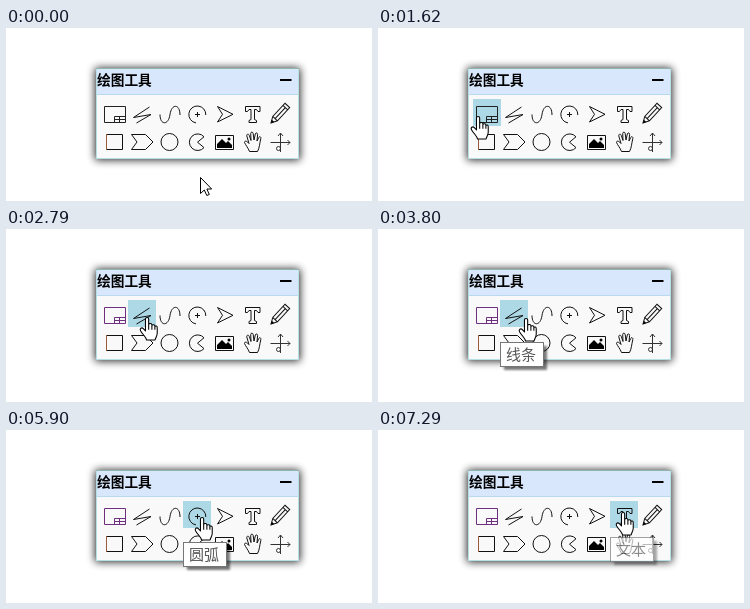
Animation of 366 by 173 pixels, one loop 8 s. Source, as an HTML page:

```html
<!DOCTYPE html>
<html lang="zh-CN">
<head>
<meta charset="utf-8">
<title>绘图工具</title>
<style>
  html, body { margin: 0; width: 100%; height: 100%; overflow: hidden; background: #fff; }
  svg { display: block; width: 366px; height: 173px; }
  text { font-family: "Noto Sans CJK SC", "Noto Sans CJK", sans-serif; }
  .title { font-size: 13.7px; font-weight: 700; fill: #000; }
  .icons { fill: none; stroke: #111; }
  .solid { fill: #000; stroke: none; }
  .cursor { fill: #fff; stroke: #000; stroke-linejoin: round; }
  #tipText { font-size: 15px; fill: #575757; }
</style>
</head>
<body>
<svg viewBox="0 0 366 173">
  <defs>
    <filter id="glow" x="-10%" y="-25%" width="120%" height="150%"><feGaussianBlur stdDeviation="4.5"/></filter>
    <filter id="soft" x="-10%" y="-20%" width="120%" height="150%"><feGaussianBlur stdDeviation="1"/></filter>
  </defs>

  <rect x="89" y="40" width="205" height="92" fill="#000" opacity=".85" filter="url(#glow)"/>
  <rect x="90.5" y="40.5" width="202" height="90" fill="#f9f9f9" stroke="#b5dfe3"/>
  <rect x="91" y="41" width="201" height="25" fill="#d9e7fd"/>
  <path d="M90 40.5H293" stroke="#8fb5ac"/>
  <path d="M91 66.5H292" stroke="#b9d9ee"/>
  <text class="title" x="91" y="57">绘图工具</text>
  <path d="M274 52H285.500" stroke="#000" stroke-width="2"/>

  <rect id="hover" y="71" width="28" height="27" fill="#add8e6"/>

  <g class="icons">
    <g id="sheet"><path d="M98.5 78.5H119.5V94.5H98.5Z"/><path d="M108.5 94V88.5H119M108.5 91.5H119M113.5 88.5V94"/></g>
    <path d="M143.5 79L127.500 89.500L145 86.500L130.500 95"/>
    <path d="M154 86.500C154 97.500 162.500 97.500 164 86.500S174 75.500 174 87"/>
    <path d="M190 94.900A8.500 8.500 0 1 1 199.800 87M189 86.500H194M191.500 84V89"/>
    <path d="M211.500 78.500L227 86.300L211.500 94L216.500 86.300Z"/>
    <path d="M239.500 78.500H254V83.500H252L250.500 81.500H248.500V91.500L250.500 92.500V94.500H243V92.500L245 91.500V81.500H243L241.500 83.500H239.500Z"/>
    <g transform="translate(265 95) rotate(-47)">
      <path d="M0 0L6 -3.200H24V3.200H6ZM6 -3.200V3.200M6 0H21M21 -3.200V3.200"/>
      <path class="solid" d="M0 0L3 -1.600V1.600Z"/>
    </g>

    <path d="M100.500 106.500H116.500V121.500H100.500Z"/>
    <path d="M100.500 106V122" stroke="#9a5a3c"/>
    <path d="M125.500 106.500H139.500L147 114L139.500 121.500H125.500L131 114Z"/>
    <circle cx="163.500" cy="114" r="8.500"/>
    <path d="M198 108.800A8.300 8.300 0 1 0 198 119.600L191.500 114.200Z"/>
    <path d="M209.500 107.500H227.500V121.500H209.500Z"/>
    <path class="solid" d="M211 120V116L216 111L220 115L222 113L226 117V120Z"/>
    <circle class="solid" cx="223" cy="111" r="1.500"/>
    <path d="M243.500 123.500C242 119.500 239.500 117 238.500 114.500C238.500 112.500 240.500 112.500 243 115.500L240.800 108C240.500 105.800 242.700 105.500 243.300 107.500L245 112.500L244.700 105.500C244.700 103.700 247 103.700 247.200 105.500L248 112L249.300 106C249.800 104.300 251.800 104.800 251.600 106.500L251 113L252.700 109.500C253.500 108 255.300 108.800 254.800 110.500C253.500 116 253.500 120 251.500 123.500Z"/>
    <g stroke="#333">
      <path d="M274.500 105V124M264.500 114.500H284M272 108L274.500 105L277 108M281.500 112L284 114.500L281.500 117"/>
      <circle cx="272.500" cy="120.500" r="2"/>
    </g>
  </g>

  <g id="tip">
    <rect id="tipShadow" x="4" y="4" height="24" fill="#000" opacity=".5" filter="url(#soft)"/>
    <rect id="tipBox" x=".5" y=".5" height="24" fill="#fff" stroke="#767676"/>
    <text id="tipText" x="6" y="17.500"></text>
  </g>

  <circle id="click" cx="194.500" cy="149.500" r="12.500" fill="#ff0" opacity=".47"/>
  <path id="arrow" class="cursor" d="M.5 .5V16.500L4.300 13L6.800 18.500L9.300 17.500L6.900 12H11.700Z"/>
  <g id="hand"><path class="cursor" transform="scale(1.07)" d="M-.5 1.800C-.5 .1 2.500 .1 2.500 1.800V7C3 5.700 5.500 5.900 5.500 7.500V8C6 6.800 8.300 7 8.300 8.500V9C9 8 10.500 8.300 10.500 10V15C10.500 18 9 19 8.500 21.500H.5C.5 19.500-2.500 17-5 13C-6.300 10.800-4 9.300-2.500 10.800L-.5 13ZM2.500 7V12M5.500 8V12M8.300 9V12"/></g>
</svg>
<script>
const LOOP = 8000, TICK = 76, PITCH = 27.4, FIRST_LEFT = 95;
const $ = id => document.getElementById(id);

// One stop per button: the pointer sets off at `start`, the tooltip comes `wait` ms later.
const home = { x: 194, y: 149 };
const stops = [
  { start: 920, steps: 10, x: 99, y: 88, wait: 1250, text: '图纸设置', bend: { x: 12, y: 145 } },
  { start: 2550, steps: 4, x: 140, y: 88, wait: 1030, text: '线条' },
  { start: 3800, steps: 3, x: 157, y: 90, wait: 160, text: '贝塞尔曲线' },
  { start: 4820, steps: 3, x: 185, y: 87, wait: 160, text: '圆弧' },
  { start: 5900, steps: 3, x: 209, y: 86, wait: 220, text: '箭头' },
  { start: 6990, steps: 3, x: 244, y: 82, wait: 150, text: '文本' }
];

const easeOut = p => 1 - (1 - p) ** 1.3;
const mix = (a, b, p) => a + (b - a) * p;
const mixPoint = (a, b, p) => ({ x: mix(a.x, b.x, p), y: mix(a.y, b.y, p) });
const stepsSince = (t, start) => Math.floor((t - start) / TICK) + 1;
const buttonLeft = i => Math.round(FIRST_LEFT + PITCH * i);
const show = (el, on) => el.setAttribute('visibility', on ? 'visible' : 'hidden');
const place = (el, x, y) => el.setAttribute('transform', `translate(${Math.round(x)} ${Math.round(y)})`);

function pointerAt(t) {
  const i = stops.filter(s => s.start <= t).length - 1;
  if (i < 0) return home;
  const from = stops[i - 1] || home, to = stops[i];
  const p = easeOut(Math.min(1, stepsSince(t, to.start) / to.steps));
  if (!to.bend) return mixPoint(from, to, p);
  return mixPoint(mixPoint(from, to.bend, p), mixPoint(to.bend, to, p), p);
}

function buttonAt({ x, y }) {
  return y >= 71 && y < 98 ? Math.floor((x - FIRST_LEFT) / PITCH) : -1;
}

function drawTip(t, button) {
  const stop = stops[button];
  const start = stop && stop.start + stop.wait;
  const on = stop && t >= start;
  show($('tip'), on);
  if (!on) return;
  const from = stops[button - 1] || home;
  const entryX = Math.max(buttonLeft(button), Math.min(from.x, stop.x));
  const width = stop.text.length * 15 + 14;
  $('tip').setAttribute('opacity', Math.min(1, stepsSince(t, start) / 3));
  $('tipBox').setAttribute('width', width - 1);
  $('tipShadow').setAttribute('width', width - 1);
  $('tipText').textContent = stop.text;
  place($('tip'), entryX, stop.y + 25);
}

function draw(t) {
  const pointer = pointerAt(t);
  const button = buttonAt(pointer);
  const over = button >= 0;
  show($('hover'), over);
  $('hover').setAttribute('x', buttonLeft(button));
  show($('hand'), over);
  show($('arrow'), !over);
  place(over ? $('hand') : $('arrow'), pointer.x, pointer.y);
  show($('click'), t >= 380 && t < 530);
  $('sheet').setAttribute('stroke', button > 0 ? '#6f2f80' : '#222');
  drawTip(t, button);
}

const begin = performance.now();
function tick() {
  draw((performance.now() - begin) % LOOP);
  requestAnimationFrame(tick);
}
tick();
</script>
</body>
</html>
```
